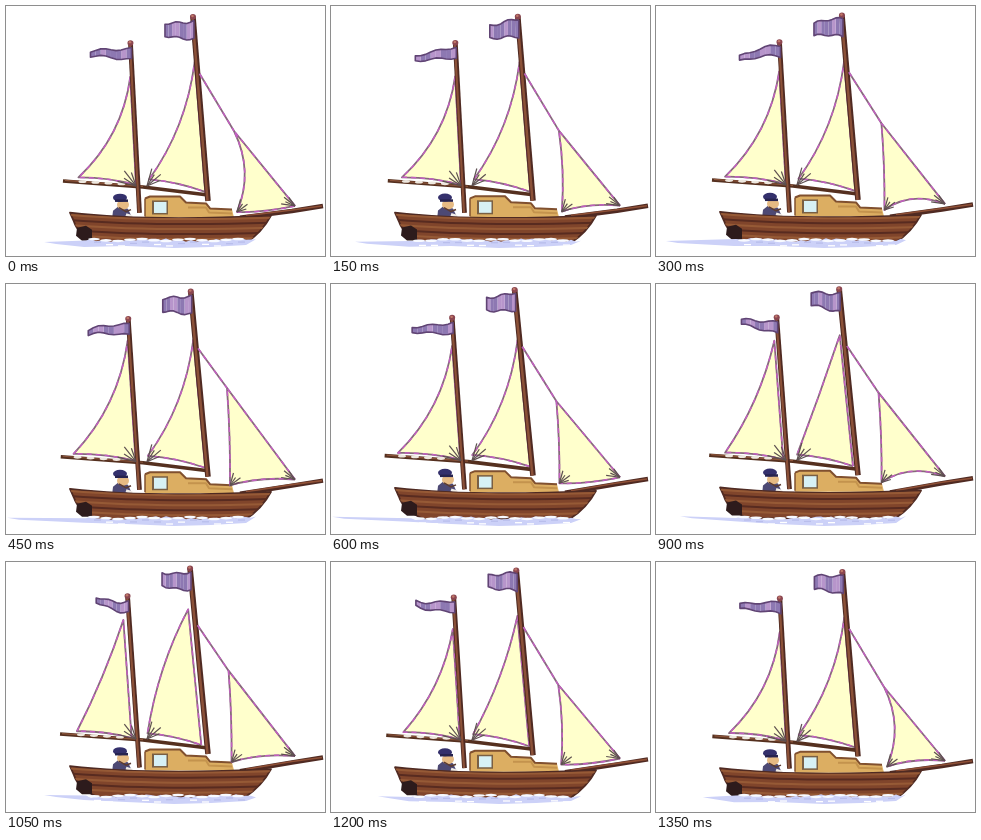
An HTML page with a canvas that plays this animation: 319x250 px, repeating every 1500 ms.

```html
<!DOCTYPE html>
<html lang="en">
<head>
<meta charset="utf-8">
<title>Sailing boat</title>
<style>
html, body { margin: 0; width: 100%; height: 100%; overflow: hidden; background: #fff; }
canvas { display: block; width: 100%; height: 100%; }
</style>
</head>
<body>
<canvas id="stage" width="319" height="250"></canvas>
<script>
const ctx = document.getElementById('stage').getContext('2d');
const STEP = 150, STEPS = 10;
const CREAM = '#ffffcc', DARK = '#4f2a22', PINK = '#c25fc0';

const cycle = at => Math.cos(2 * Math.PI * at / STEPS);
const bump = d => Math.exp(-d * d);

function line(pts, color, width = 1, fill) {
  ctx.beginPath();
  for (let i = 0; i < pts.length; i += 2) ctx.lineTo(pts[i], pts[i + 1]);
  if (fill) { ctx.closePath(); ctx.fillStyle = fill; ctx.fill(); }
  if (color) stroke(color, width);
}

function stroke(color, width) {
  ctx.strokeStyle = color;
  ctx.lineWidth = width;
  ctx.stroke();
}

// Dark edge broken up by pink dashes
function seam() {
  stroke('#86687c', 1.8);
  ctx.setLineDash([5, 4]);
  stroke(PINK, 1.5);
  ctx.setLineDash([]);
}

function dot(x, y, rx, ry, color) {
  ctx.fillStyle = color;
  ctx.beginPath();
  ctx.ellipse(x, y, rx, ry, 0, 0, 7);
  ctx.fill();
}

const along = (m, y) => m.x + (m.footX - m.x) * (y - m.y) / (m.footY - m.y);

// The belly pushes the free edge towards the mast.
function drawSail(mast, headY, x, y, footY, belly, gap) {
  const luff = at => along(mast, at) - 2 - gap;
  const hx = luff(headY);
  ctx.beginPath();
  ctx.moveTo(luff(footY), footY);
  ctx.lineTo(hx, headY);
  ctx.quadraticCurveTo((hx + x) / 2 + belly * 1.8, (headY + y) / 2 + belly * 0.9, x, y);
  ctx.quadraticCurveTo((x + luff(footY)) / 2, (y + footY) / 2 - 4, luff(footY), footY);
  ctx.fillStyle = CREAM;
  ctx.fill();
  seam();
}

function creases(x, y, from, to, size) {
  for (let i = 0; i < 4; i++) {
    const a = from + (to - from) * i / 3, r = size * (i % 2 ? 1 : 0.75);
    line([x, y, x + r * Math.cos(a), y - r * Math.sin(a)], '#5d5050', 1.2);
  }
}

function drawMast(m, width) {
  line([m.x, m.y, m.footX, m.footY], DARK, width);
  line([m.x - 0.5, m.y, m.footX - 0.5, m.footY], '#8b5138', width * 0.45);
  dot(m.x, m.y, 3, 2.8, '#8b4650');
  dot(m.x - 0.5, m.y - 0.8, 1.3, 1.2, '#c07868');
}

function drawFlag(m, drop, length, height, taper, tip, phase) {
  const parts = 8, top = [], low = [];
  for (let i = 0; i <= parts; i++) {
    const s = i / parts;
    const mid = m.y + drop + tip * s * s + 2.5 * Math.sin(6 * s) * Math.sin(phase + 3 * s);
    const half = height / 2 * (1 - taper * s);
    const x = m.x + 1 - length * s;
    top.push([x, mid - half]);
    low.push([x, mid + half]);
  }
  for (let i = 0; i < parts; i++) {
    const light = Math.sin(i * 1.6 + phase) > 0.3;
    const quad = [top[i], top[i + 1], low[i + 1], low[i]].flat();
    line(quad, null, 0, light ? '#b795cb' : '#8d78b2');
  }
  const edge = [...top, ...low.reverse()].flat();
  line([...edge, ...top[0]], '#604474', 1.6);
}

function drawJib(mast, at, roll, gust) {
  const slack = 10 * Math.max(0, cycle(at + 0.5)) ** 4;
  const hx = 228 - 7 * gust, hy = 125 - 21 * gust;
  const bx = 231 - 7 * gust, by = 202 + 4 * roll;
  const cx = 289, cy = 196 + 4 * roll;
  const arch = 4 + 5 * Math.cos((at - 2) * Math.PI / 2);
  ctx.beginPath();
  ctx.moveTo(cx, cy);
  ctx.lineTo(hx, hy);
  ctx.quadraticCurveTo((hx + bx) / 2 + 2 * slack + 2, (hy + by) / 2, bx, by);
  ctx.quadraticCurveTo((bx + cx) / 2 - 4, (by + cy) / 2 + 2 - 2 * arch, cx, cy);
  ctx.fillStyle = CREAM;
  ctx.fill();
  seam();
  const top = mast.y + 57;
  ctx.beginPath();
  ctx.moveTo(along(mast, top) + 2, top);
  ctx.lineTo(hx, hy);
  seam();
  creases(bx, by, 0.3, 1.3, 13);
  creases(cx, cy, 2.2, 3, 14);
}

function drawSailor(y) {
  line([106, y + 22, 107, y + 13, 112, y + 9, 122, y + 11, 127, y + 22], null, 0, '#4d4974');
  dot(117, y + 7, 6, 5, '#e6ba83');
  line([113, y + 10, 120, y + 14, 125, y + 12], '#5c3b30', 1.5);
  line([120, y + 17, 126, y + 19], '#f2eee9', 3);
  dot(114, y, 7, 4, '#34306c');
  line([109, y + 3, 122, y + 3], '#27234f', 2.5);
}

function drawCabin(y) {
  const roof = [139, y + 2, 144, y, 174, y, 180, y + 6, 200, y + 7, 204, y + 12, 226, y + 13];
  line([...roof, 228, y + 21, 139, y + 21], null, 0, '#dcae62');
  line([182, y + 11, 200, y + 11, 203, y + 16, 226, y + 17], '#c4934d', 2);
  line(roof, '#80502f', 2);
  line([139, y + 2, 139, y + 20], '#80502f', 1.5);
  ctx.fillStyle = '#795f43';
  ctx.fillRect(146, y + 4, 16, 14);
  ctx.fillStyle = '#d7f1f5';
  ctx.fillRect(148, y + 5.5, 12.5, 11);
}

function drawHull(y, tipY) {
  line([234, y + 5, 286, tipY + 5, 317, tipY], DARK, 4.5);
  line([240, y + 3, 286, tipY + 4, 316, tipY], '#8f5036', 1.6);
  ctx.beginPath();
  ctx.moveTo(64, y);
  ctx.quadraticCurveTo(140, y + 9, 265, y + 3);
  ctx.quadraticCurveTo(256, y + 20, 239, y + 31);
  ctx.lineTo(92, y + 31);
  ctx.quadraticCurveTo(72, y + 22, 68, y + 9);
  ctx.closePath();
  ctx.fillStyle = '#80452b';
  ctx.fill();
  stroke(DARK, 1.8);
  ctx.save();
  ctx.clip();
  for (let i = 0; i < 5; i++) {
    const drop = 3 + i * 5;
    ctx.beginPath();
    ctx.moveTo(61, y + drop - 1);
    ctx.quadraticCurveTo(145, y + drop + 6, 268, y + drop + 2);
    stroke(i % 2 ? '#582b20' : '#965a36', 2);
  }
  ctx.restore();
  line([71, y + 15, 80, y + 13, 86, y + 17, 86, y + 28, 76, y + 28, 70, y + 23], null, 0, '#2d1b1c');
}

function drawWater(x, y, at) {
  const edge = [x, y];
  for (let px = 80; px <= 250; px += 5) {
    edge.push(px, 234 + Math.sin(px * 0.075 + at * 1.9) + Math.sin(px * 0.5 - at * 2.3));
  }
  line([...edge, 240, 239, 205, 241, 168, 242, 120, 240, 78, y + 5, x + 12, y + 2], null, 0, '#ccd1f8');
  // Foam along the hull and glints below it
  for (let px = 88; px < 240; px += 12) {
    const lift = 2 * Math.sin(px * 1.7 + at * 2);
    dot(px, 234 + lift * 0.5, 6, 1.3, '#f8faff');
    line([px, 238 + lift, px + 7, 238 + lift], lift > 0 ? '#fff' : '#b9beec', 1.3);
  }
}

function draw(at) {
  const roll = cycle(at - 0.3);
  const gust = bump(at - 3) + bump(at - 6.5);
  const haul = bump(at - 6.8);
  const mizzen = { x: 122.5 + 2 * roll, y: 35 + 2 * roll, footX: 133.5, footY: 206 + roll };
  const main = { x: 185 + 2 * roll, y: 7.8 + 3 * roll, footX: 202, footY: 193 + 2 * roll };
  const deck = 205 + 1.7 * roll;
  const boomX = 55 + 2 * roll, boomY = 173 + 2 * roll;
  const clewX = 70 + 3 * cycle(at + 1), clewY = 170 + 1.5 * roll;
  const gap = 4 * haul;

  ctx.fillStyle = '#fff';
  ctx.fillRect(0, 0, 319, 250);
  ctx.lineJoin = 'round';

  drawSail(mizzen, 68 + 3 * roll - 11 * gust, clewX, clewY, boomY + 4, 10 - 8 * haul, gap);
  drawSail(main, 56 - 9 * haul, 142 + roll, clewY + 2, boomY + 11, 8 - 14 * haul, gap);
  line([boomX, boomY, 137, boomY + 6, 202, boomY + 14], '#55301f', 3.6);
  line([boomX + 2, boomY - 0.5, 137, boomY + 5.5], '#8d553b', 1.2);
  // Rope loops between sail and boom
  for (let x = clewX + 4; x < 118; x += 13)
    dot(x, boomY - 0.5 + (x - boomX) * 0.06, 4, 1.4, '#eee8df');
  drawSailor(deck - 15);
  drawCabin(188.5 + 2 * roll);
  drawMast(mizzen, 4.8);
  drawMast(main, 5.6);
  creases(130, boomY + 5, 1.9, 2.9, 19);
  creases(141, boomY + 5, 0.4, 1.3, 18);
  drawHull(deck, 197 + 3 * roll);
  drawJib(main, at, roll, gust);

  const tip = 6 * cycle(at - 2);
  drawFlag(mizzen, 10, 41 - 9 * haul, 11, 0.55, tip, at * 1.9);
  drawFlag(main, 12.5, 29, 18, 0.3, tip * 0.4, at * 1.9 + 1);
  drawWater(24 + 24 * cycle(at + 1.5), 234 + 2 * roll, at);
}

function tick() {
  draw(Math.floor(performance.now() / STEP) % STEPS);
  requestAnimationFrame(tick);
}
tick();
</script>
</body>
</html>
```
